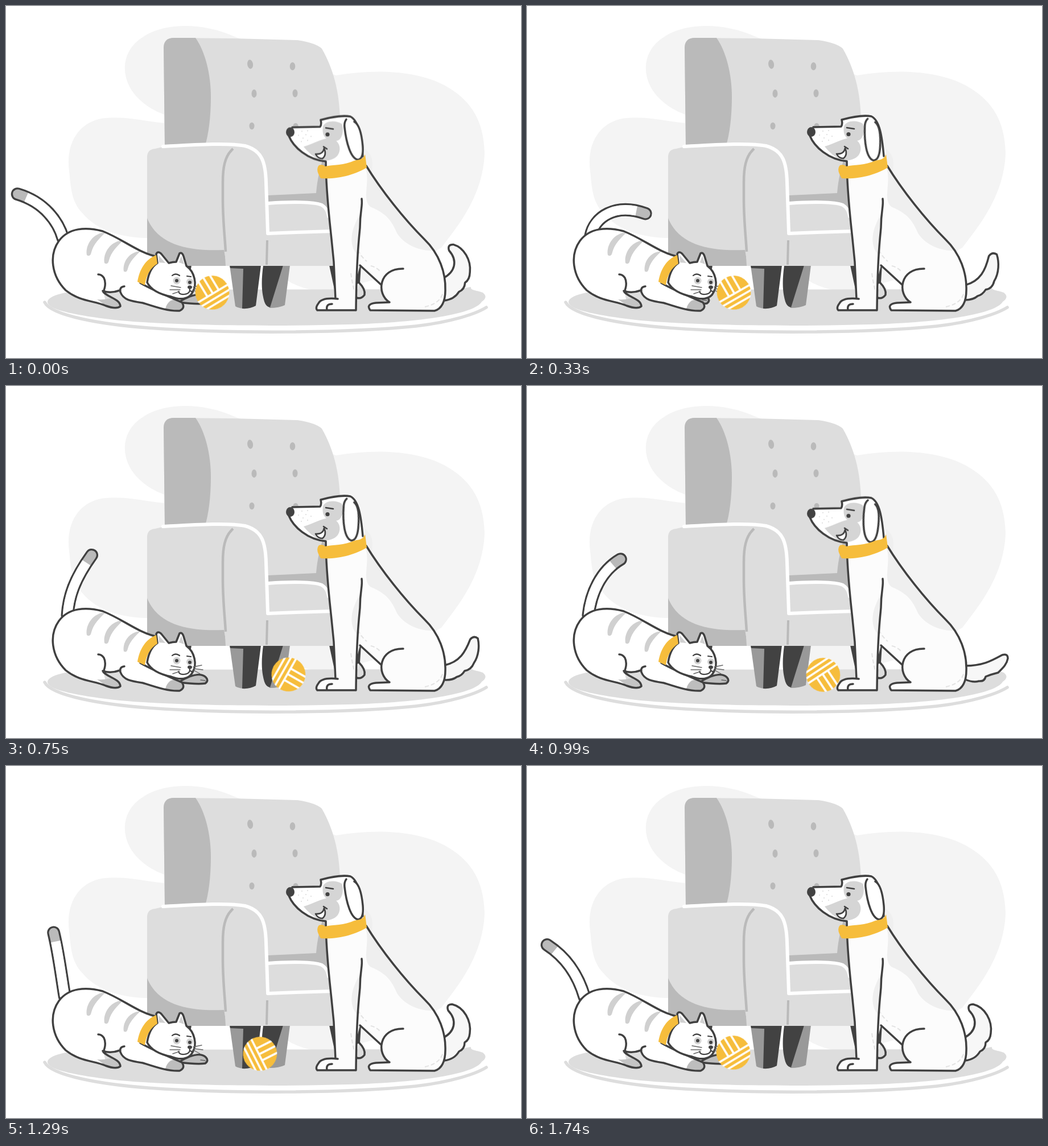
Write an HTML page without scripts that moves like this. It is 905 px wide and 619 px high and loops after 1770 ms.

```html
<!DOCTYPE html>
<html lang="en">
<head>
<meta charset="utf-8">
<title>Cat, dog and a ball of yarn</title>
<style>
html, body { margin: 0; width: 100%; height: 100%; overflow: hidden; background: #fff; }
svg { display: block; width: 905px; height: 619px; }
.blob { fill: #f4f4f4; }
.pale { fill: #ddd; }
.shade { fill: #bababa; }
.dark { fill: #424242; }
.mid { fill: #999; }
.gold { fill: #f6bd3c; }
.seam, .ink, .hair { fill: none; stroke-linecap: round; stroke-linejoin: round; }
.seam { stroke: #fff; stroke-width: 6; }
.ink { stroke: #404040; stroke-width: 3.5; }
.hair { stroke: #666; stroke-width: 1.4; }
.white { fill: #fff; }
.coat { fill: #fcfcfc; }

/* cat */
.tail { fill: none; stroke-linecap: round; animation: swish .59s linear infinite; }
@keyframes swish {
  0%, 100% { d: path("M100 408C92 380 68 345 20 331"); }
  10%, 94.9% { d: path("M101 406C92 375 75 340 36 314"); }
  18.6%, 85.6% { d: path("M103 405C97 370 92 330 82 293"); }
  27.1% { d: path("M108 403C110 370 120 340 150 297"); }
  41.5% { d: path("M110 403C118 368 138 322 192 328"); }
  55.9% { d: path("M112 404C118 372 155 346 209 366"); }
  67.8% { d: path("M108 403C112 365 130 325 165 305"); }
  76.3% { d: path("M106 405C105 370 112 325 131 292"); }
}
.paw { animation: bat 1.77s linear infinite; }
@keyframes bat {
  0%, 10%, 23%, 100% { transform: translateX(0); }
  16%, 19% { transform: translateX(-34px); }
}

/* yarn */
.ball { animation: roll 1.77s cubic-bezier(.3,.05,.65,1) infinite; }
@keyframes roll {
  0%, 17.8%, 94%, 100% { transform: translate(0, 0) rotate(0deg); }
  52% { transform: translate(161px, 4px) rotate(181deg); animation-timing-function: cubic-bezier(.4,0,.63,1); }
}

/* dog */
.wag { animation: wag .4425s linear infinite; }
@keyframes wag {
  0%, 91.5%, 100% { d: path("M768 478C788 468 794 448 777 430Q773 419 784 419C805 424 818 448 815 470Q814 482 806 486Q806 498 796 502Q788 516 770 518"); }
  1.7% { d: path("M770 482C793 470 799 452 789 430Q789 420 799 422C808 432 812 442 817 452Q821 478 811 489Q806 502 795 507Q786 516 770 518"); }
  23.7%, 45% { d: path("M770 492C800 492 815 484 835 473Q845 470 845 479C843 490 836 496 828 504Q816 507 806 511Q804 520 794 519Q784 522 770 516"); }
  74.6% { d: path("M770 491C797 484 806 464 812 440Q818 432 826 437C830 450 830 470 821 484Q818 497 806 499Q800 508 792 510Q784 517 770 517"); }
}
.head { animation: nod .4425s linear infinite; }
@keyframes nod {
  0%, 64%, 100% { transform: translateY(0); }
  1.7%, 45% { transform: translateY(2.8px); }
}
.ear { transform-origin: 603px 203px; animation: flap .4425s linear infinite; }
@keyframes flap {
  0%, 91%, 100% { transform: rotate(0deg); }
  1.7% { transform: rotate(2deg); }
  23.7%, 45% { transform: rotate(13.5deg); }
  72% { transform: rotate(10deg); }
}
</style>
</head>
<body>
<svg viewBox="0 0 905 619">
  <defs>
    <clipPath id="round"><circle r="30"/></clipPath>
    <path id="stripe" d="M175 398C153 399 139 420 142 438Q148 442 150 433C154 418 164 409 175 398Z"/>
  </defs>

  <!-- backdrop -->
  <path class="blob" d="M402 54C350 30 280 27 240 55C203 78 198 125 230 160Q250 181 278 191L278 206C240 202 210 194 175 197C130 201 104 240 111 290C114 320 115 345 135 365C160 395 205 408 250 408L460 440C480 490 530 502 570 502L690 470L765 425C800 380 838 330 841 260C840 205 820 170 780 145C730 113 650 110 580 122Z"/>

  <!-- rug -->
  <path class="pale" d="M73 520C75 508 110 500 160 499L760 498C790 502 800 497 817 494C815 500 828 500 838 504Q848 512 836 520C825 540 740 556 600 560C470 564 300 562 200 553C130 545 72 535 73 520Z"/>
  <path d="M68 521C80 545 170 560 250 566C400 577 600 575 720 563C780 556 825 542 844 530" fill="none" stroke="#ddd" stroke-width="5.5" stroke-linecap="round"/>

  <!-- chair legs -->
  <path class="dark" d="M318 456H326L324 468ZM568 456H624L622 486L580 512Z"/>
  <path class="mid" d="M393 456H420L417 532Q408 531 403 528ZM484 456H499L490 526Q480 531 463 531Z"/>
  <path class="dark" d="M393 456H448L439 527Q429 533 415 532L417 462L394 461ZM452 456H487L464 530Q457 529 454 520C448 500 449 480 452 456Z"/>

  <!-- armchair -->
  <path class="pale" d="M277 72Q278 57 295 56L400 57L512 60Q545 65 555 75C575 110 586 150 587 200V340L577 457H248V264Q249 252 262 251L279 247Z"/>
  <path class="shade" d="M277 72Q278 56 295 56L333 56C350 80 360 120 360 160C360 195 356 225 350 245L279 246Z"/>
  <path class="shade" d="M460 333L545 329C547 305 552 285 556 272L575 300V370L556 348L460 345Z"/>
  <path class="shade" d="M248 373C265 415 310 432 383 429L388 457H248Z"/>
  <path class="pale" d="M384 425L390 457H386Z"/>
  <path d="M399 251C384 264 381 285 381 310V340C381 375 384 400 386 432" fill="none" stroke="#bababa" stroke-width="4.5"/>
  <path d="M459 412L458 455" stroke="#bababa" stroke-width="4"/>
  <path class="pale" d="M463 350C500 347 540 347 556 354L568 372L570 393L463 397Z"/>
  <path class="seam" d="M276 247C330 244 390 240 420 246C450 254 456 275 457 310L460 398M461 347C500 344 540 344 555 350Q565 356 567 370M460 400L510 398L573 396"/>
  <g class="shade">
    <ellipse cx="429" cy="102.500" rx="5" ry="8" transform="rotate(-8 429 102)"/>
    <ellipse cx="503.500" cy="106" rx="4.800" ry="7"/>
    <ellipse cx="436" cy="154" rx="4.500" ry="7.200"/>
    <ellipse cx="508" cy="153.500" rx="4.500" ry="7"/>
    <ellipse cx="432" cy="211" rx="4.500" ry="6.200"/>
    <ellipse cx="509" cy="211" rx="4.500" ry="5"/>
  </g>

  <!-- cat -->
  <path class="tail" stroke="#404040" stroke-width="23" d="M100 408C92 380 68 345 20 331"/>
  <path class="tail" stroke="#bababa" stroke-width="16.500" d="M100 408C92 380 68 345 20 331"/>
  <path class="tail" stroke="#fff" stroke-width="16.500" pathLength="100" stroke-dasharray="86 100" style="stroke-linecap:butt" d="M100 408C92 380 68 345 20 331"/>
  <path class="white" d="M93 413C110 390 140 388 170 396C205 410 230 432 262 440L250 490L300 520L240 522C215 520 205 512 201 500L172 505L176 526C160 520 130 520 105 500C80 475 75 435 93 413Z"/>
  <g fill="#d0d0d0">
    <use href="#stripe"/>
    <use href="#stripe" x="31" y="14"/>
    <use href="#stripe" transform="translate(82 81) scale(.88)"/>
  </g>
  <path fill="#c4c4c4" d="M160 516C180 518 186 510 192 515Q202 522 200 528Q190 534 176 527Z"/>
  <path class="ink" d="M262 440C230 432 205 410 170 396C140 388 110 390 93 413C75 438 80 475 105 500C130 520 155 518 175 527Q194 534 201 528C200 515 180 513 171 503Q177 488 172 478Q168 472 162 472M170 501Q184 506 200 500"/>
  <g class="paw">
    <path class="ink" style="fill:#bdbdbd" d="M305 520C325 508 342 504 351 512Q357 518 350 523Q335 525 305 521Z"/>
    <path class="hair" d="M342 517L350 518"/>
  </g>
  <path class="white" d="M203 495C202 515 215 520 240 522C265 530 285 537 305 536Q315 531 309 520C295 515 260 500 235 485Z"/>
  <path fill="#bdbdbd" d="M280 532Q285 515 300 516Q316 523 310 533Q298 538 280 532Z"/>
  <path class="ink" d="M208 493Q199 494 201 503C206 517 220 519 240 522C265 530 285 537 305 536Q316 531 309 521C295 515 260 501 236 487"/>
  <path class="ink" style="fill:#fff" d="M248 486C251 467 258 457 266 452L264 436Q267 430 273 436L286 452Q293 450 299 450L305 435Q309 432 312 440L317 457C332 468 336 490 328 503C322 517 305 517 290 511C270 507 255 500 248 486Z"/>
  <path fill="#d0d0d0" d="M268 438L280 452L269 451ZM308 439L313 454L304 451Z"/>
  <path class="gold" d="M264 438C245 446 235 462 231 485L244 491C246 474 254 460 266 453Z"/>
  <g fill="#d3d3d3"><circle cx="300" cy="483" r="6.500"/><circle cx="323" cy="485" r="6"/></g>
  <g class="dark"><circle cx="300" cy="483" r="3"/><circle cx="323" cy="486" r="3"/><ellipse cx="323" cy="494.500" rx="4" ry="3"/></g>
  <path class="ink" style="stroke-width:2.2" d="M292 474Q298 469 305 474M318 475L325 476M323 497Q324 506 313 507Q305 508 303 502M324 501L328 503"/>
  <path class="hair" d="M290 492L307 495M288 499L306 499M293 506L305 502M329 494L344 491M330 497L346 499M330 500L341 506"/>

  <!-- yarn -->
  <g transform="translate(362.500 504)">
    <g class="ball">
      <g transform="rotate(-31)" clip-path="url(#round)">
        <circle class="gold" r="30"/>
        <path d="M-30 2H30M-30 11H30M-30 20H30M-11 -30V2M0 -30V2M12 -30V2" fill="none" stroke="#fff" stroke-width="3.600"/>
      </g>
    </g>
  </g>

  <!-- dog -->
  <path class="ink wag" style="fill:#f7f7f7" d="M768 478C788 468 794 448 777 430Q773 419 784 419C805 424 818 448 815 470Q814 482 806 486Q806 498 796 502Q788 516 770 518"/>
  <path class="ink" style="fill:#ddd" d="M620 486Q632 498 630 508Q624 516 616 513"/>
  <path class="coat" d="M562 270L632 278C660 325 700 375 735 410C762 436 773 470 772 500C772 520 765 533 753 536L640 535Q632 524 650 522L674 521Q658 512 658 490L622 456L616 480L615 535L547 535Q546 518 560 515H579L576 450C571 400 563 340 562 270Z"/>
  <path fill="#efefef" d="M631 251Q644 262 644 276L643 296C665 330 700 375 735 410Q748 422 756 430C735 432 705 425 688 401C680 385 675 367 640 353C625 340 640 310 632 285ZM623 365C607 390 600 420 618 438Z"/>
  <path d="M618 429Q625 442 634 449M641 457Q651 459 659 468M606 470Q609 490 612 500M736 529Q764 523 768 503" fill="none" stroke="#e2e2e2" stroke-width="2" stroke-dasharray="7 4"/>
  <path class="ink" d="M562 272C562 325 569 380 572 410L576 450L579 515M625 339C627 352 622 360 622 390C618 430 616 460 615 535M622 456L659 490M633 281C660 325 700 375 735 410C762 436 773 470 772 500C772 520 765 533 753 536L640 535Q632 524 650 522L674 521C650 506 655 461 698 462"/>
  <path class="ink" style="fill:#fcfcfc" d="M583 515Q555 512 549 523Q543 531 547 535L614 535M564 534Q562 524 573 524"/>

  <g class="head">
    <path class="white" d="M499 214L552 212Q556 208 554 200C575 194 595 192 605 194C620 200 625 230 627 264C617 285 590 282 562 273C535 270 505 245 498 228Z"/>
    <path fill="#d5d5d5" d="M557 212C560 201 580 200 590 207C594 216 592 236 580 237C565 238 554 230 557 212ZM523 247C545 240 560 230 570 233C587 235 590 252 583 262C575 272 560 273 552 270Q535 263 523 247Z"/>
    <path class="ink" d="M503 213L552 212Q555 208 553 200C575 194 595 192 605 194C620 201 624 230 627 264M497 228C505 248 530 270 562 273"/>
    <ellipse class="dark" cx="499.500" cy="221.500" rx="7.500" ry="8.500"/>
    <circle class="dark" cx="565" cy="225.500" r="3.600"/>
    <path class="ink" style="stroke-width:2.6" d="M562 214L575 216M558 247L564 251"/>
    <path class="ink" style="fill:#fff;stroke-width:2.6" d="M544 260Q557 261 559 250Q564 262 556 268Q548 268 544 260Z"/>
    <path d="M514 227h0M520 220h0M522 232h0M527 226h0M530 219h0M536 229h0M519 238h0M530 236h0" stroke="#bbb" stroke-width="1.600" stroke-linecap="round"/>
    <path class="ink ear" style="fill:#fff" d="M598 199Q594 204 595 213C598 240 606 268 619 270Q629 268 627 245C625 224 621 208 612 203"/>
  </g>
  <path class="gold" d="M550 280Q543 287 553 303C585 305 615 296 634 284L631 261C627 271 620 270 612 272C595 280 575 279 561 282Q557 278 550 280Z"/>
</svg>
</body>
</html>
```
